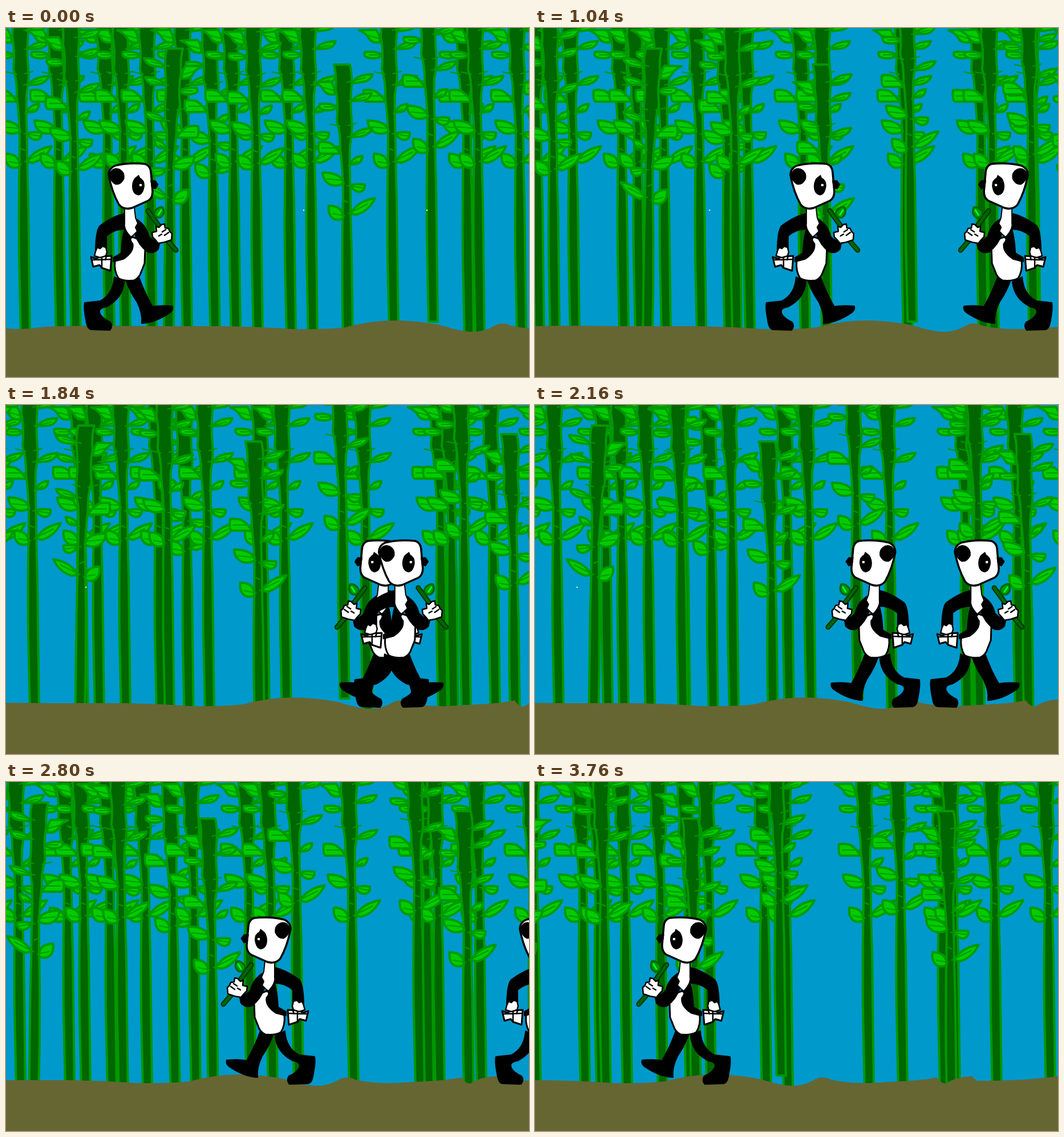
Animation, 917 px wide and 611 px high, one loop 3840 ms. Source, as an HTML page with a canvas:

```html
<!DOCTYPE html>
<html lang="en">
<head>
<meta charset="utf-8">
<title>Two pandas in a bamboo forest</title>
<style>
html, body { margin: 0; overflow: hidden; background: #09c; }
canvas { display: block; }
</style>
</head>
<body>
<canvas id="stage" width="917" height="611"></canvas>
<script>
const ctx = document.getElementById('stage').getContext('2d');
const STEP = 80, STEPS = 48;
const path = (...parts) => new Path2D(parts.join(' '));

function paint(shape, fill, stroke, width = 3) {
  if (fill) { ctx.fillStyle = fill; ctx.fill(shape); }
  if (stroke) { ctx.strokeStyle = stroke; ctx.lineWidth = width; ctx.stroke(shape); }
}

// Bamboo: x is measured from the foot of the stalk
const stalk = path(
  'M-25 -27 Q-20 -8 -22 15 Q-17 40 -20 72 Q-13 95 -14 120 Q-9 160 -9 200 Q-11 300 -10 400 L-7 540',
  'H9 Q8 420 6 300 Q4 240 4 200 Q2 150 3 115 Q8 90 6 70 Q3 40 6 10 Q7 -10 3 -27 Z');
const leaves = path(
  'M-23 25 Q-38 28 -44 16 Q-48 9 -60 4 L-30 3 Q-24 10 -23 25',
  'M-20 47 Q-28 40 -50 42 Q-54 52 -38 53 Q-24 54 -20 47',
  'M-14 129 Q-20 118 -32 110 Q-42 107 -52 109 Q-54 128 -48 129 Z',
  'M-8 181 Q-12 162 -45 162 Q-44 178 -30 184 Q-18 187 -8 181',
  'M-9 242 Q-9 220 -34 220 Q-36 238 -24 244 Q-14 246 -9 242',
  'M7 6 Q14 -10 43 -10 Q38 3 22 4 Z',
  'M6 37 Q14 24 41 23 Q38 34 26 36 Z',
  'M6 100 Q14 86 42 84 Q38 96 22 99 Z',
  'M4 148 Q8 134 25 133 Q24 145 14 147 Z',
  'M4 184 Q14 181 29 183 Q30 196 18 196 Q8 194 4 184',
  'M4 234 Q16 212 47 207 Q36 230 14 236 Z');
const veins = path(
  'M-44 13 L-22 19 M-42 47 H-18 M-46 119 H-14 M-38 173 L-8 176 M-27 234 L-6 238',
  'M-2 4 L30 -4 M0 37 L30 30 M-2 100 L30 91 M0 150 L16 142 M-2 185 L26 189 M0 234 L34 217',
  'M-32 77 L-14 81 M0 80 L14 76 M-8 211 L0 214');

function bamboo(x, drop = 0, flip = 1) {
  ctx.save();
  ctx.translate(x, drop);
  ctx.scale(flip, 1);
  paint(stalk, '#060', '#090', 4);
  paint(leaves, '#0c0', '#090', 4);
  paint(veins, null, '#090', 2);
  ctx.restore();
}

const farStalks = [33, 95, 181, 209, 255, 317, 366, 402, 499, 537, 679, 811, 830, 903, 997];
const nearStalks = [
  [122, 13], [441, 3], [748, -26], [961, -13],
  [285, 63, -1], [600, 91], [1048, 78]
];

const ground = path(
  'M-10 524 Q20 530 60 524 Q100 520 250 522 L380 522 Q450 523 500 527 Q560 528 595 524',
  'Q640 512 682 512 Q730 513 765 521 Q800 532 820 532 Q840 531 855 522 Q870 513 885 521',
  'Q915 528 955 527 L1009 524 Q1050 522 1071 517 Q1078 528 1087 528 Q1105 516 1132 515',
  'L1142 523 L1170 523 Q1235 522 1284 515 L1320 515 V620 H-10 Z');

// Panda
const legs = path(
  'M190 436 Q188 466 165 478 L138 481 Q136 490 140 510 Q142 528 150 528 L182 529',
  'Q188 522 183 515 Q165 506 164 497 Q163 490 176 488 Q204 474 207 445 Z',
  'M210 440 Q216 460 230 480 Q240 500 238 517 Q262 516 288 498 Q294 492 292 487',
  'Q270 485 257 488 Q243 464 233 436 Z');
const backArm = path(
  'M208 325 Q190 328 165 346 Q158 352 157 388 H176 V364 Q190 352 208 352',
  'Q203 370 202 394 L188 402 V409 H205 Q222 400 224 386 Q223 370 210 355 Z');
const belly = path(
  'M222 366 Q238 370 244 385 L243 412 L235 432 Q230 440 224 442 Q208 444 197 438',
  'Q189 425 191 408 L206 404 Q224 392 222 378 Q214 368 222 366');
const neck = path('M208 314 H225 L227 332 L231 342 L227 349 L230 356 L224 362 L219 366 Q206 352 208 342 Z');
const frontArm = path(
  'M228 334 Q246 345 250 364 Q258 375 270 372 L267 387 Q260 396 248 392 Q232 380 226 361',
  'L231 355 L228 348 L232 343 Z');
const head = path(
  'M180 258 Q180 246 191 241 Q215 235 244 238 Q253 241 254 252 L257 286',
  'Q257 297 250 302 L221 315 Q206 319 198 309 Q186 288 180 258');
const earAndNose = path(
  'M183 252 Q188 243 199 247 Q209 252 207 264 Q202 275 192 274 Q183 270 181 256 Z',
  'M254 267 L262 267 L267 274 L262 282 L256 280 Z');
const eye = path('M229 260 L233 257 L235 262 Q243 266 243 276 Q241 292 232 293 Q221 291 221 276 Q222 264 229 260');
const backHand = path('M157 391 L160 384 L165 386 L169 382 L175 384 L177 392 L175 399 L165 402 L155 399 Z');
const box = path('M149 401 L158 404 L166 400 L185 399 L183 425 L168 420 L164 415 L153 418 Z');
const boxLines = path('M151 406 L184 405 M168 400 L168 420 M176 400 L174 406');
const frontHand = path(
  'M256 358 L264 356 L263 347 L268 349 L273 344 L278 343 L279 350 L285 351 L287 356 L291 360 L290 371',
  'L278 375 L267 377 L262 371 L257 366 Z');
const fingers = path('M274 357 L280 353 M278 363 L285 358 M268 364 L273 361');
const stem = path('M249 320 L268 346 L285 374 L298 389');
const sprout = path('M264 332 Q256 325 263 318 Q270 312 275 314 Q280 326 270 332 Z');
const glint = path('M267 327 L272 319');

function panda(x, flip) {
  ctx.save();
  ctx.translate(x, 0);
  ctx.scale(flip, 1);
  for (const limb of [legs, backArm]) paint(limb, '#000', '#000', 2);
  paint(belly, '#fff', '#000');
  paint(neck, '#fff', '#000', 2);
  paint(frontArm, '#000', '#000', 2);
  paint(head, '#fff', '#000', 3.5);
  paint(earAndNose, '#000', '#000', 1);
  paint(eye, '#000');
  paint(box, '#fff', '#000');
  paint(boxLines, null, '#000', 2.5);
  paint(backHand, '#fff', '#000', 2.5);
  paint(stem, null, '#030', 9);
  paint(stem, null, '#060', 5);
  paint(sprout, '#090', '#060');
  paint(glint, null, '#0f3', 3);
  paint(frontHand, '#fff', '#000', 2.5);
  paint(fingers, null, '#000', 2.5);
  ctx.fillStyle = '#fff';
  ctx.fillRect(234, 273, 4, 4);
  ctx.fillRect(737, 318, 2, 2);
  ctx.restore();
}

function draw(now) {
  const n = Math.floor(now / STEP) % STEPS;
  ctx.fillStyle = '#09c';
  ctx.fillRect(0, 0, 917, 611);
  ctx.lineJoin = ctx.lineCap = 'round';
  for (const x of farStalks) bamboo(x - 2 * n, x === 366 ? 18 : 0);
  for (const [x, drop, flip] of nearStalks) bamboo(x - 6.75 * n, drop, flip);
  ctx.save();
  ctx.translate(-7.8 * n, 0);
  paint(ground, '#663');
  ctx.restore();
  panda(1260 - 16.6 * n, -1);
  panda(20.6 * n, 1);
}

const start = performance.now();
function tick() {
  draw(performance.now() - start);
  requestAnimationFrame(tick);
}
tick();
</script>
</body>
</html>
```
